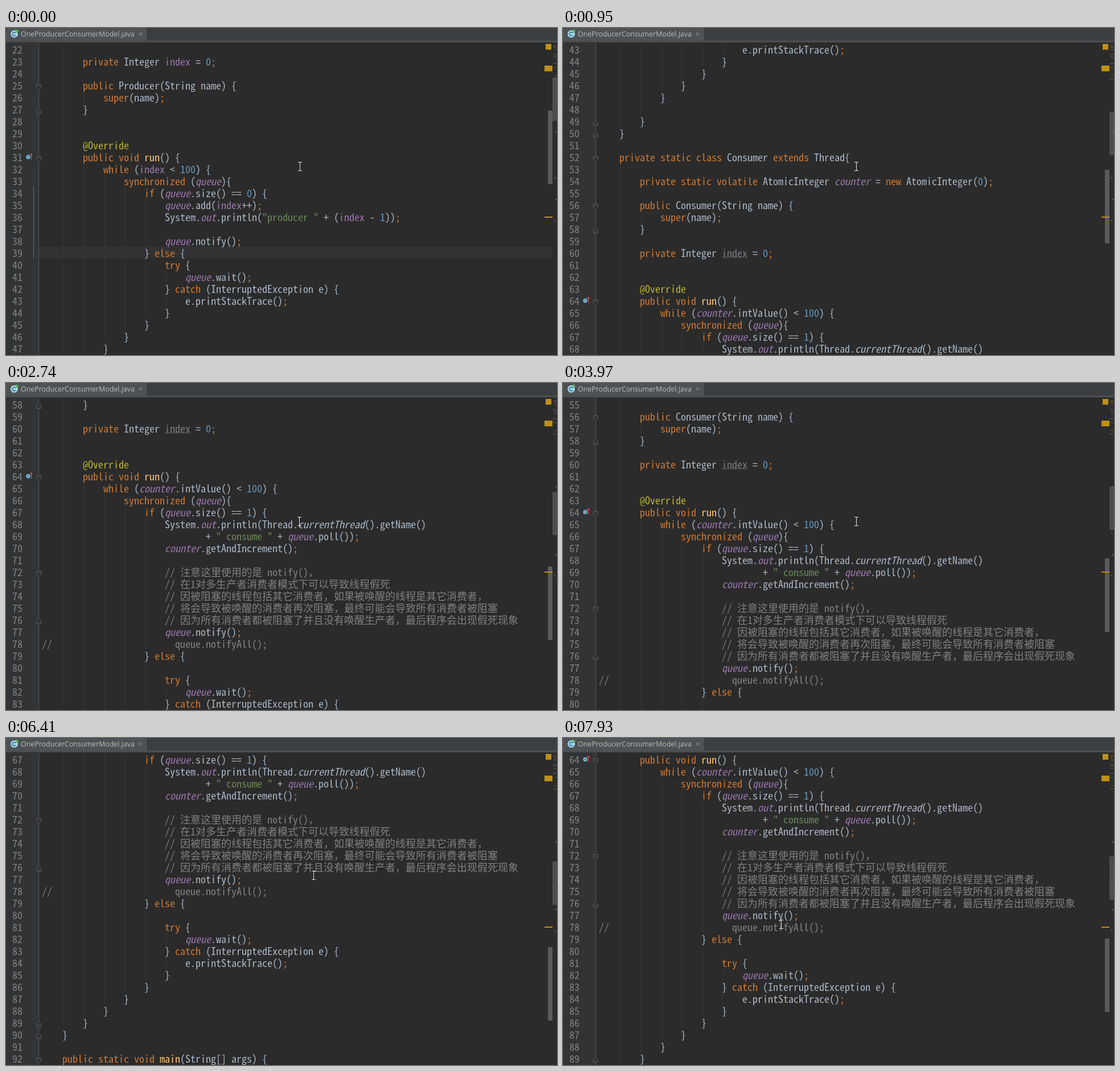
An HTML page that plays this animation: 968 by 574 pixels, repeating every 8000 ms.

```html
<!DOCTYPE html>
<html lang="en">
<head>
<meta charset="utf-8">
<title>Code editor walkthrough</title>
<style>
html, body { margin: 0; width: 100%; height: 100%; overflow: hidden; background: #2b2b2b; }
svg { display: block; }
text { white-space: pre; }
.code { font-family: "Noto Sans Mono CJK SC", "Liberation Mono", monospace; fill: #a9b7c6; }
.cjk { font-family: "Noto Sans CJK SC", "Noto Sans CJK", "Noto Sans Mono CJK SC", sans-serif; font-size: 18px; font-weight: 300; }
.num { fill: #808284; }
.kw { fill: #cc7832; }
.str { fill: #6a8759; }
.cmt { fill: #808080; }
.ann { fill: #bbb529; }
.lit { fill: #6897bb; }
.field { fill: #9876aa; }
.static { fill: #9876aa; font-style: italic; }
.call { font-style: italic; }
.decl { fill: #ffc66d; }
.unused { fill: #787b80; }
.tab { font: 12.4px "Open Sans", "Noto Sans", sans-serif; fill: #bbbbbb; }
</style>
</head>
<body>
<svg id="stage" width="968" height="574" viewBox="0 0 968 574" xmlns="http://www.w3.org/2000/svg"></svg>
<script>
const LOOP = 8000, FIRST = 22, ROWS = 26, ROW = 21, TOP = 26, LEFT = 63, COL = 9;

const source = `
        private Integer index = 0;

        public Producer(String name) {
            super(name);
        }


        @Override
        public void run() {
            while (index < 100) {
                synchronized (queue){
                    if (queue.size() == 0) {
                        queue.add(index++);
                        System.out.println("producer " + (index - 1));

                        queue.notify();
                    } else {
                        try {
                            queue.wait();
                        } catch (InterruptedException e) {
                            e.printStackTrace();
                        }
                    }
                }
            }

        }
    }

    private static class Consumer extends Thread{

        private static volatile AtomicInteger counter = new AtomicInteger(0);

        public Consumer(String name) {
            super(name);
        }

        private Integer index = 0;


        @Override
        public void run() {
            while (counter.intValue() < 100) {
                synchronized (queue){
                    if (queue.size() == 1) {
                        System.out.println(Thread.currentThread().getName()
                                + " consume " + queue.poll());
                        counter.getAndIncrement();

                        // 注意这里使用的是 notify()，
                        // 在1对多生产者消费者模式下可以导致线程假死
                        // 因被阻塞的线程包括其它消费者，如果被唤醒的线程是其它消费者，
                        // 将会导致被唤醒的消费者再次阻塞，最终可能会导致所有消费者被阻塞
                        // 因为所有消费者都被阻塞了并且没有唤醒生产者，最后程序会出现假死现象
                        queue.notify();
//                        queue.notifyAll();
                    } else {

                        try {
                            queue.wait();
                        } catch (InterruptedException e) {
                            e.printStackTrace();
                        }
                    }
                }
            }
        }
    }

    public static void main(String[] args) {`.split("\n");

const foldStarts = [25, 31, 52, 56, 64, 72, 92];
const foldEnds = [27, 49, 50, 58, 76, 89, 90];
const overrides = [31, 64];
const unusedLine = 60;

// time, first visible line, pointer x, pointer y
const steps = [
  [0, 22, 516, 243], [120, 25, 516, 243], [240, 28, 516, 243], [550, 34, 515, 243],
  [950, 43, 515, 243], [1650, 49, 515, 243], [2740, 58, 515, 243], [3970, 55, 515, 243],
  [4370, 55, 498, 225], [4490, 55, 480, 207], [4640, 55, 464, 184], [4760, 55, 451, 165],
  [5010, 55, 448, 164], [5130, 55, 443, 169], [5280, 55, 429, 150], [5430, 55, 421, 134],
  [6110, 55, 498, 227], [6260, 64, 535, 240], [6410, 67, 540, 241], [7250, 64, 540, 241],
  [7810, 64, 440, 296], [7930, 64, 383, 327]
];
const CLICK = 5710;

const svg = document.getElementById("stage");

function add(parent, tag, attrs, content) {
  const node = document.createElementNS(svg.namespaceURI, tag);
  for (const key in attrs) node.setAttribute(key, attrs[key]);
  if (content !== undefined) node.textContent = content;
  parent.appendChild(node);
  return node;
}
const rect = (parent, x, y, width, height, fill) => add(parent, "rect", { x, y, width, height, fill });
const stroke = (parent, d, color, width = 1) =>
  add(parent, "path", { d, fill: "none", stroke: color, "stroke-width": width });
const rowTop = line => TOP + (line - FIRST) * ROW;

// Pick the size at which the available monospace face advances one column.
const probe = add(svg, "text", { class: "code", "font-size": 18 }, "n".repeat(10));
const codeSize = 18 * 10 * COL / (probe.getComputedTextLength() || 10 * COL);
probe.remove();

const tokenRules = [
  ["cmt", /^\/\/.*/],
  ["str", /^"[^"]*"/],
  ["ann", /^@\w+/],
  ["kw", /^(private|public|static|volatile|class|extends|new|super|void|while|synchronized|if|else|try|catch)\b|^;/],
  ["static", /^(queue|counter|out)\b/],
  ["field", /^index\b/],
  ["call", /^currentThread\b/],
  ["decl", /^(run|main)(?=\()/],
  ["lit", /^\d+/],
  ["", /^\w+|^[^\w\s;"@]/]
];
const isWide = ch => ch > "\u2e7f";

function drawRuns(parent, text, col, y, kind) {
  for (const run of text.match(/[\u2e80-\uffff]+|[^\u2e80-\uffff]+/g)) {
    const wide = isWide(run[0]);
    const attrs = { x: LEFT + col * COL, y, class: `code ${kind}${wide ? " cjk" : ""}` };
    add(parent, "text", attrs, run);
    col += run.length * (wide ? 2 : 1);
  }
}

function drawLine(parent, text, line) {
  const y = rowTop(line) + 19;
  let col = 0;
  while (col < text.length) {
    const rest = text.slice(col);
    const space = rest.match(/^\s+/);
    if (space) { col += space[0].length; continue; }
    for (const [kind, rule] of tokenRules) {
      const hit = rest.match(rule);
      if (!hit) continue;
      drawRuns(parent, hit[0], col, y, kind === "field" && line === unusedLine ? "unused" : kind);
      col += hit[0].length;
      break;
    }
  }
}

// Blank lines take the deeper neighbour; continuation lines keep the statement's depth.
function indentOf(i) {
  const text = source[i];
  if (text === undefined) return 4;
  if (/^\s*\+/.test(text) || text.startsWith("//")) return indentOf(i - 1);
  if (text) return text.search(/\S/);
  let a = i, b = i;
  while (a >= 0 && !source[a]) a--;
  while (b < source.length && !source[b]) b++;
  return Math.max(a < 0 ? 8 : indentOf(a), indentOf(b));
}

function drawFold(parent, line, dir) {
  const y = rowTop(line) + 14.5;
  add(parent, "path", {
    d: `M53.5 ${y - 4 * dir}h8v${5 * dir}l-4 ${4 * dir}l-4 ${-4 * dir}z`,
    fill: "#2b2b2b", stroke: "#606366"
  });
  stroke(parent, `M55.5 ${y - dir}h4`, "#606366");
}

function drawOverride(parent, line) {
  const y = rowTop(line);
  add(parent, "circle", { cx: 39, cy: y + 11.5, r: 3.4, fill: "#cfdde3", stroke: "#4387a8", "stroke-width": 1.6 });
  add(parent, "circle", { cx: 39, cy: y + 11.5, r: 1.5, fill: "#35617a" });
  stroke(parent, `M44.5 ${y + 16}v-10M42.5 ${y + 8.5}l2-3l2 3`, "#d0564f", 1.2);
}

// Editor background
rect(svg, 0, 0, 968, 574, "#2b2b2b");
rect(svg, 0, TOP, 57, 548, "#313335");
const page = add(svg, "g", { "font-size": codeSize });
const caretRow = rect(page, 58, 0, 902, ROW, "#323232");

source.forEach((text, i) => {
  for (let col = 4; col < indentOf(i); col += 4)
    rect(page, LEFT + col * COL + 2, rowTop(FIRST + i), 1, ROW, "#373737");
});
rect(page, 48, rowTop(34), 1, 6 * ROW, "#4f8069");
rect(svg, 57, TOP, 1, 548, "#55585a");
const marks = add(svg, "g", {});

const lines = source.map((text, i) => {
  const line = FIRST + i;
  const group = add(page, "g", {});
  add(group, "text", { x: 11, y: rowTop(line) + 19, class: "code num" }, line);
  drawLine(group, text, line);
  return group;
});
stroke(page, `M279 ${rowTop(unusedLine) + 20.5}` + "l2-2l2 2".repeat(11), "#77787a", 0.9);
foldStarts.forEach(line => drawFold(marks, line, 1));
foldEnds.forEach(line => drawFold(marks, line, -1));
overrides.forEach(line => drawOverride(marks, line));
const caret = rect(page, 369, rowTop(60), 2, ROW, "#d0d0d0");

// Scroll bar, overview strip and warning marks
const thumb = rect(svg, 952, 0, 8, 129, "#595b5d");
const view = rect(svg, 960, 0, 8, 76, "#4b4d4f");
[[31, "#7d5a3c"], [34, "#6f5644"], [38, "#7d5a3c"], [46, "#4f6b4b"], [49, "#557050"], [53, "#4f6b4b"],
 [62, "#6b6658"], [69, "#4f6b4b"], [83, "#6f6a3c"], [89, "#75603f"]]
  .forEach(([y, color], i) => rect(svg, 961 + i % 3, y, 6 - i % 3, 1, color));
[181, 262, 300, 337].forEach((y, i) => {
  rect(svg, 965 - i % 2 * 2, y, 2, 2, "#66696b");
  rect(svg, 966, y + 3, 1, 1, "#66696b");
});
rect(svg, 948, 28, 10, 10, "#be9117");
rect(svg, 946, 66, 14, 10, "#be9117");
rect(svg, 946, 331, 14, 2, "#be9117");

// Tab bar
rect(svg, 0, 0, 968, 22, "#3c3f41");
rect(svg, 0, 0, 248, 22, "#4e5254");
rect(svg, 248, 0, 1, 22, "#2f3133");
rect(svg, 0, 22, 968, 3, "#4b4f51");
rect(svg, 0, 25, 968, 1, "#323435");
add(svg, "circle", { cx: 14.5, cy: 10.5, r: 6.5, fill: "#a9d5e4" });
stroke(svg, "M17 8.6a3.2 3.2 0 1 0 0 4", "#2f7f9f", 1.7);
add(svg, "path", { d: "M17 2l5.5 3.5l-5.5 3.5z", fill: "#5fb865" });
add(svg, "text", { x: 26, y: 15, class: "tab" }, "OneProducerConsumerModel.java");
stroke(svg, "M234 8l5 5m0-5l-5 5", "#808385", 1.1);

const pointer = stroke(svg, "M-3-7.5h7M.5-7.5v15M-3 7.5h7", "#e4e4e4");

function render(t) {
  const [, top, x, y] = steps.filter(step => step[0] <= t).pop();
  const shift = `translate(0 ${(FIRST - top) * ROW})`;
  page.setAttribute("transform", shift);
  marks.setAttribute("transform", shift);
  lines.forEach((group, i) => {
    const row = FIRST + i - top;
    group.setAttribute("visibility", row >= 0 && row < ROWS ? "visible" : "hidden");
  });
  thumb.setAttribute("y", Math.round(145 + (top - FIRST) * 4.93));
  view.setAttribute("y", Math.round(87 + (top - FIRST) * 2.88));
  pointer.setAttribute("transform", `translate(${x} ${y})`);
  const clicked = t >= CLICK;
  caretRow.setAttribute("y", rowTop(clicked ? 60 : 39));
  caret.setAttribute("visibility", clicked ? "visible" : "hidden");
}

const start = performance.now();
function tick(now) {
  render(Math.max(0, now - start) % LOOP);
  requestAnimationFrame(tick);
}
render(0);
requestAnimationFrame(tick);
</script>
</body>
</html>
```
